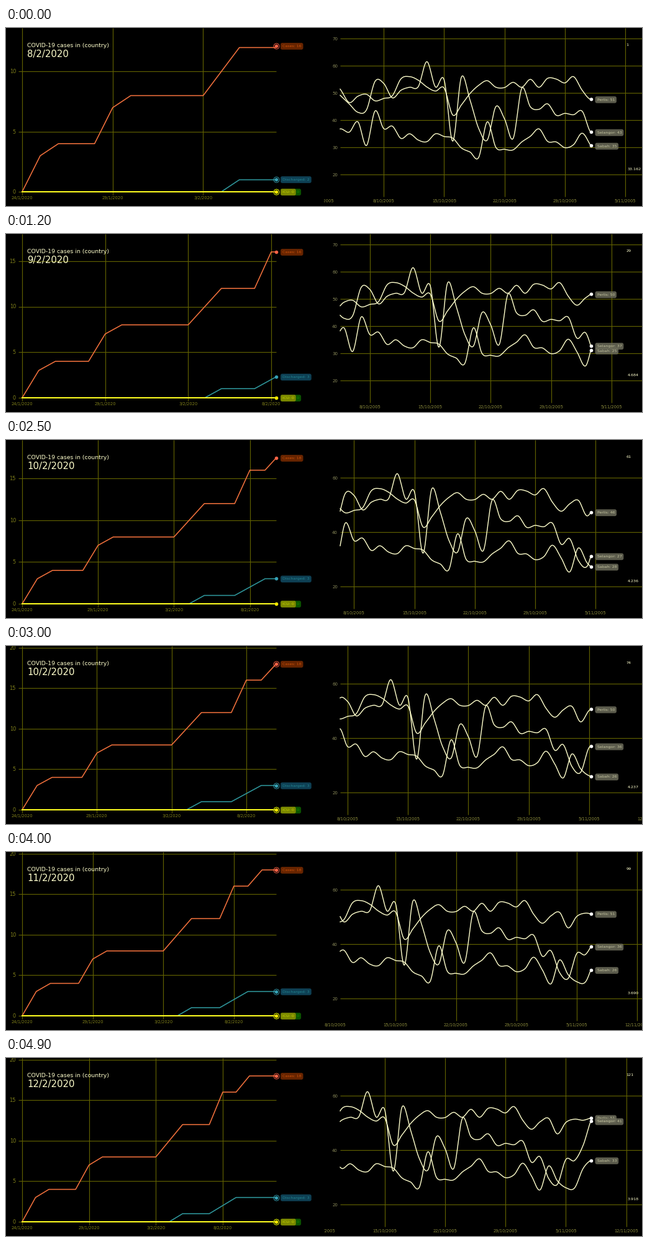
A matplotlib script that plays this animation: 1024 px wide and 288 px high, repeating every 5000 ms.

```python
import math
import numpy as np
import matplotlib.pyplot as plt
from matplotlib.animation import FuncAnimation
from matplotlib.patches import Rectangle

W, H, FRAMES, STEP = 1024, 288, 50, 100
CREAM, GRID = "#ffffcc", "#5f5f00"

plt.rcParams["font.family"] = "DejaVu Sans"
fig = plt.figure(figsize=(W / 72, H / 72), dpi=72, facecolor="black")
ax = fig.add_axes([0, 0, 1, 1])

# Left chart: one value per day, starting on 24/1/2020
CASES = [0, 3, 4, 4, 4, 7, 8, 8, 8, 8, 8, 10, 12, 12, 12, 16, 16, 18, 18, 18]
DISCHARGED = [0] * 12 + [1, 1, 1, 2, 3, 3, 3, 3]
ZERO = [0] * 20
LEFT = [  # name, values, line, dot, box, text, line width
    ("Cases", CASES, "#f0703c", "#ff6347", "#702800", "#c8500a", 1.6),
    ("Discharged", DISCHARGED, "#2f979c", "#35a0b4", "#10465c", "#23838f", 1.6),
    ("Death", ZERO, "#1f9000", "#1f9000", "#0d5a00", "#149600", 1.6),
    ("ICU", ZERO, "#ffff20", "#ffe600", "#848c00", "#c8d200", 2),
]
X0, X1, BASE, TOP = 26, 435, 265, 29
MOVE, PERIOD, LEAD = 0.6, 1.04, 0.02

# Right chart: one value per day, day 0 is 15/10/2005
FIRST = -13
RIGHT = {
    "Perlis": [55, 51.2, 46.5, 48.8, 49.5, 47.1, 48, 49, 55.2, 56, 54.7, 52.2,
               50.7, 51.8, 41.9, 45.6, 49.8, 52.8, 54.5, 52.1, 52, 53.9, 52.1,
               55, 52.1, 55.4, 55.1, 53.7, 56, 51, 47.7, 50.4, 51.7, 46, 50.2,
               51.4, 51, 51.9, 52],
    "Selangor": [52, 49, 46, 42.9, 43.8, 54.3, 53.5, 48.2, 51, 52.1, 52.3, 61.5,
                 52.2, 54.8, 32.3, 55.8, 47.4, 37, 32.7, 45, 40.5, 33.3, 51.7,
                 44.9, 44, 46, 41.8, 42.5, 42, 43.3, 35.6, 37.6, 29.6, 27.4,
                 36.6, 36.2, 41.8, 51.5, 54],
    "Sabah": [35, 36.8, 35.6, 39.4, 30.7, 43.4, 36.9, 37.8, 33.3, 35, 32.7, 32.1,
              35, 34, 33.4, 29.8, 28.3, 26.3, 39.4, 30, 29.3, 29.1, 32, 34.1,
              36.8, 32.2, 32, 29.9, 31, 35.2, 30.6, 25.4, 34.2, 28.8, 26.2,
              26.1, 33.3, 36.5, 37],
}
DAY_W, PLOT_X, HEAD_X = 13.89, 538, 941.5
RATE_AT = [0, 6, 12, 20, 30, 40, 49]
RATE = [33.162, 5.718, 4.684, 4.236, 4.237, 3.690, 3.918]


def text(x, y, s, size, color, ha="left", **kw):
    return ax.text(x, y, s, size=size, color=color, ha=ha, va="baseline", **kw)


def segment(xs, ys, alpha=1):
    ax.plot(xs, ys, color=GRID, lw=1.2, alpha=alpha, zorder=1,
            solid_capstyle="butt")


def dot(x, y, color, size=5.6):
    ax.plot([x], [y], "o", ms=size, mfc=color, mec="none", zorder=6)


def tag(x, y, s, fill, color, alpha, z):
    ax.text(x, y, s, size=6.2, color=color, va="center", zorder=z,
            bbox=dict(boxstyle="round,pad=0.48,rounding_size=0.45",
                      fc=fill, ec="none", alpha=alpha))


def date(day, month, offset, length, year):
    """Format a date `offset` days after day/month, for months of one length."""
    d = day + offset
    while d > length:
        d, month = d - length, month + 1
    while d < 1:
        d, month = d + 30, month - 1
    return f"{d}/{month}/{year}"


def spline(v, d):
    """Catmull-Rom curve through daily values."""
    v = np.asarray(v)
    u = np.asarray(d) - FIRST
    i = np.clip(np.floor(u).astype(int), 0, len(v) - 2)
    f = u - i
    m = np.gradient(v)
    return ((2 * f**3 - 3 * f**2 + 1) * v[i] + (f**3 - 2 * f**2 + f) * m[i]
            + (3 * f**2 - 2 * f**3) * v[i + 1] + (f**3 - f**2) * m[i + 1])


def draw_left(t):
    k, phase = divmod(t + LEAD, PERIOD)
    goal = 15 + int(k)
    now = goal - 1 + min(phase / MOVE, 1)
    ring = phase < 0.05 or phase > MOVE + 0.08
    days = np.arange(20)
    dx = (X1 - X0) / now
    dy = (BASE - TOP) / np.interp(now, days, CASES)

    for d in range(0, 20, 5):
        if d <= now + 1e-6:
            x = X0 + d * dx
            segment([x, x], [0, 270])
            text(x, 276.5, date(24, 1, d, 31, 2020), 6.8, "#80801a", "center")
    for v in range(0, 25, 5):
        y = BASE - v * dy
        if y > -4:
            segment([20, X1], [y, y])
            text(16, y + 3, str(v), 8.2, "#80801a", "right")

    for z, (name, vals, line, mark, fill, ink, lw) in enumerate(LEFT):
        past = days[days < now]
        xs = np.append(past, now)
        ys = BASE - np.interp(xs, days, vals) * dy
        ax.plot(X0 + xs * dx, ys, color=line, lw=lw, zorder=3)
        dot(X1, ys[-1], mark)
        if ring:
            ax.plot([X1], [ys[-1]], "o", ms=9, mfc="none", mec=mark,
                    mew=0.9, zorder=6)
        tag(445, ys[-1] + 0.5, f"{name}: {vals[goal]}", fill, ink, 0.92, 7 + z)

    text(34, 31, "COVID-19 cases in (country)", 9.36, CREAM, zorder=8)
    text(34, 47.5, date(24, 1, goal, 31, 2020), 14.9, CREAM, zorder=8)


def draw_right(i):
    n = max(1 + i, math.floor(2.5 * i - 1)) if i < 2 else math.floor(2.5 * i - 1)
    mid = 706.2 - 0.797 * n
    now = (HEAD_X - mid) / DAY_W
    height = lambda v: 237.2 - (v - 20) * 4.403

    area = Rectangle((512, 0), 512, H, transform=ax.transData)
    for d in range(-14, 36, 7):
        x = mid + d * DAY_W
        if x >= PLOT_X - 0.5:
            segment([x, x], [0, 273])
        if 490 < x < W + 22:
            label = text(x, 282, date(15, 10, d, 31, 2005), 6.8, "#8c8c3c",
                         "center", clip_on=True)
            label.set_clip_path(area)
    fade = float(np.clip(1 - (n - 42) / 14, 0, 1))
    for v in range(20, 71, 10):
        alpha = 1 if v % 20 == 0 else fade
        if alpha > 0:
            y = height(v)
            segment([PLOT_X, W], [y, y], alpha)
            text(534, y + 2.6, str(v), 7, "#8a8a5a", "right", alpha=alpha)

    ds = np.linspace((PLOT_X - mid) / DAY_W, now, 700)
    for z, (name, vals) in enumerate(RIGHT.items()):
        ys = height(spline(vals, ds))
        ax.plot(mid + ds * DAY_W, ys, color=CREAM, lw=1.4, zorder=4)
        dot(HEAD_X, ys[-1], "white")
        value = int(vals[math.floor(now) - FIRST])
        tag(951.5, ys[-1] + 0.8, f"{name}: {value}", "#6c6c5a", "#c4c4a0",
            0.85, 7 + z)

    text(998.3, 29, str(n), 6.4, CREAM)
    text(1000.3, 230.5, f"{np.interp(i, RATE_AT, RATE):.3f}", 6.4, CREAM)


def draw(i):
    ax.clear()
    ax.set_xlim(0, W)
    ax.set_ylim(H, 0)
    ax.axis("off")
    draw_left(i * STEP / 1000)
    draw_right(i)
    return []


anim = FuncAnimation(fig, draw, frames=FRAMES, interval=STEP, repeat=True,
                     repeat_delay=0, cache_frame_data=False)
plt.show()
```
